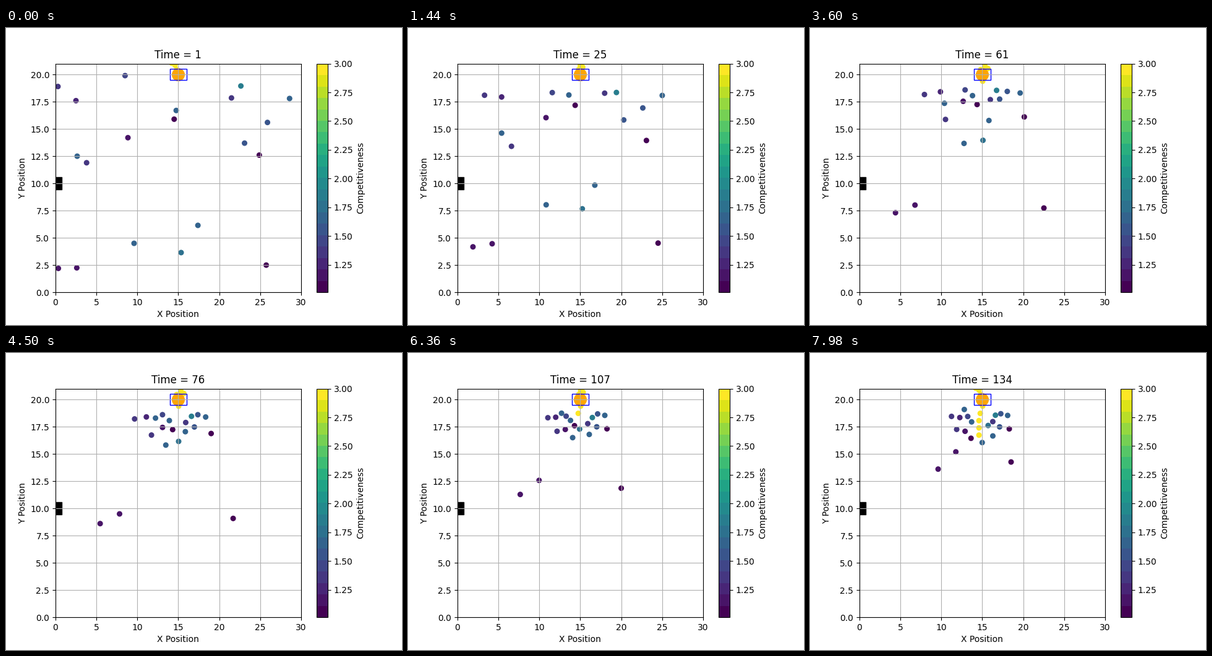
Animation, 640 px wide and 480 px high, one loop 8000 ms. Source, as a matplotlib script:

```python
import numpy as np
import matplotlib.pyplot as plt
from matplotlib.animation import FuncAnimation
from matplotlib.patches import Rectangle

STEP_MS, TICK_MS, LOOP_MS = 60, 40, 8000
LAST, SUBSTEPS = 134, 4
LOW, HIGH, BANDS = 1.01, 3.0, 20
DOOR = np.array([15.0, 20.0])
LANE = 15.2          # centre line kept free for people stepping out
LEAVERS = 5

# x, y, competitiveness; walking speed is a tenth of the latter
PEOPLE = np.array([
    (0.3, 18.9, 1.40), (2.5, 17.6, 1.25), (8.5, 19.9, 1.45), (14.75, 16.7, 1.68),
    (14.5, 15.9, 1.03), (21.5, 17.85, 1.35), (22.65, 18.95, 1.82),
    (28.6, 17.8, 1.62), (25.9, 15.6, 1.56), (23.1, 13.7, 1.53),
    (24.9, 12.6, 1.03), (8.85, 14.2, 1.20), (2.65, 12.5, 1.62),
    (3.8, 11.9, 1.32), (9.6, 4.5, 1.66), (15.35, 3.65, 1.79),
    (17.4, 6.15, 1.65), (0.35, 2.2, 1.14), (2.6, 2.25, 1.19), (25.75, 2.5, 1.05),
])


def passengers(t):
    """People at the door, then a file of them walking down from it."""
    arc = max(np.sin(np.pi * (t - 1) / (LAST - 1)), 0)
    wide = np.sqrt(arc)
    spots = [(14.6 + 0.75 * arc, 20.87 - 0.12 * arc),
             (14.2 + 1.5 * wide, 21.05 - 0.5 * wide),
             (14.8, 20.45)]
    for k in range(LEAVERS):
        y = 19.84 - 0.074 * max(0, t - 92 - 9 * k)
        if k == 0:
            y = min(y, max(19.39, 20 - 0.03 * max(0, t - 20)))
        drift = np.clip(19.39 - y, 0, 1)
        spots.append((15.05 - 0.45 * drift, y))
    return np.array(spots)


def velocity(pos, t):
    """Walk to the door; keep off neighbours, the edge, the door and the lane."""
    to_door = DOOR - pos
    dist = np.linalg.norm(to_door, axis=1, keepdims=True)
    ahead = to_door / dist
    speed = 0.1 * PEOPLE[:, 2:] * (1 - np.exp(-(t - 1) / 1.3))
    vel = ahead * (speed - np.minimum(0.15 * np.exp((2.3 - dist) / 0.25), 0.25))

    others = np.vstack([pos, passengers(t)])
    gap = pos[:, None] - others[None]
    space = np.linalg.norm(gap, axis=2, keepdims=True) + 1e-6
    vel += (gap / space * 0.15 * np.exp((0.7 - space) / 0.45)).sum(axis=1)

    x, y = pos.T
    vel[:, 1] -= np.minimum(0.03 * np.exp((y - 18.15) / 0.28), 0.25)
    off = x - LANE
    near = 1 / (1 + np.exp((16.8 - y) / 0.3))
    vel[:, 0] += 0.15 * np.sign(off) * np.exp(-off ** 2) * near
    return vel


def simulate():
    pos = PEOPLE[:, :2].copy()
    path = [pos.copy()]
    for step in range(1, LAST):
        for sub in range(SUBSTEPS):
            pos += velocity(pos, step + sub / SUBSTEPS) / SUBSTEPS
        path.append(pos.copy())
    return path


path = simulate()


def positions(t):
    return np.vstack([path[t - 1], passengers(t)])


levels = np.append(PEOPLE[:, 2], np.full(len(passengers(1)), HIGH))

fig, ax = plt.subplots(figsize=(6.4, 4.8), dpi=100)
dots = ax.scatter(*positions(1).T, s=30, c=levels, vmin=LOW, vmax=HIGH,
                  cmap=plt.get_cmap("viridis", BANDS))
ax.scatter([0], [10], s=200, c="black", marker="s")
ax.scatter(*DOOR, s=200, c="orange", marker="o")
ax.add_patch(Rectangle((14, 19.5), 2, 1, fill=False, edgecolor="blue"))
ax.set_xlim(0, 30)
ax.set_ylim(0, 21)
ax.set_xlabel("X Position")
ax.set_ylabel("Y Position")
ax.grid(True)
title = ax.set_title("Time = 1")
fig.colorbar(dots, ax=ax, label="Competitiveness")


def update(i):
    t = min((i * TICK_MS + TICK_MS // 2) // STEP_MS + 1, LAST)
    dots.set_offsets(positions(t))
    title.set_text(f"Time = {t}")
    return dots, title


anim = FuncAnimation(fig, update, frames=LOOP_MS // TICK_MS, interval=TICK_MS,
                     repeat=True, repeat_delay=0, blit=False)
plt.show()
```
